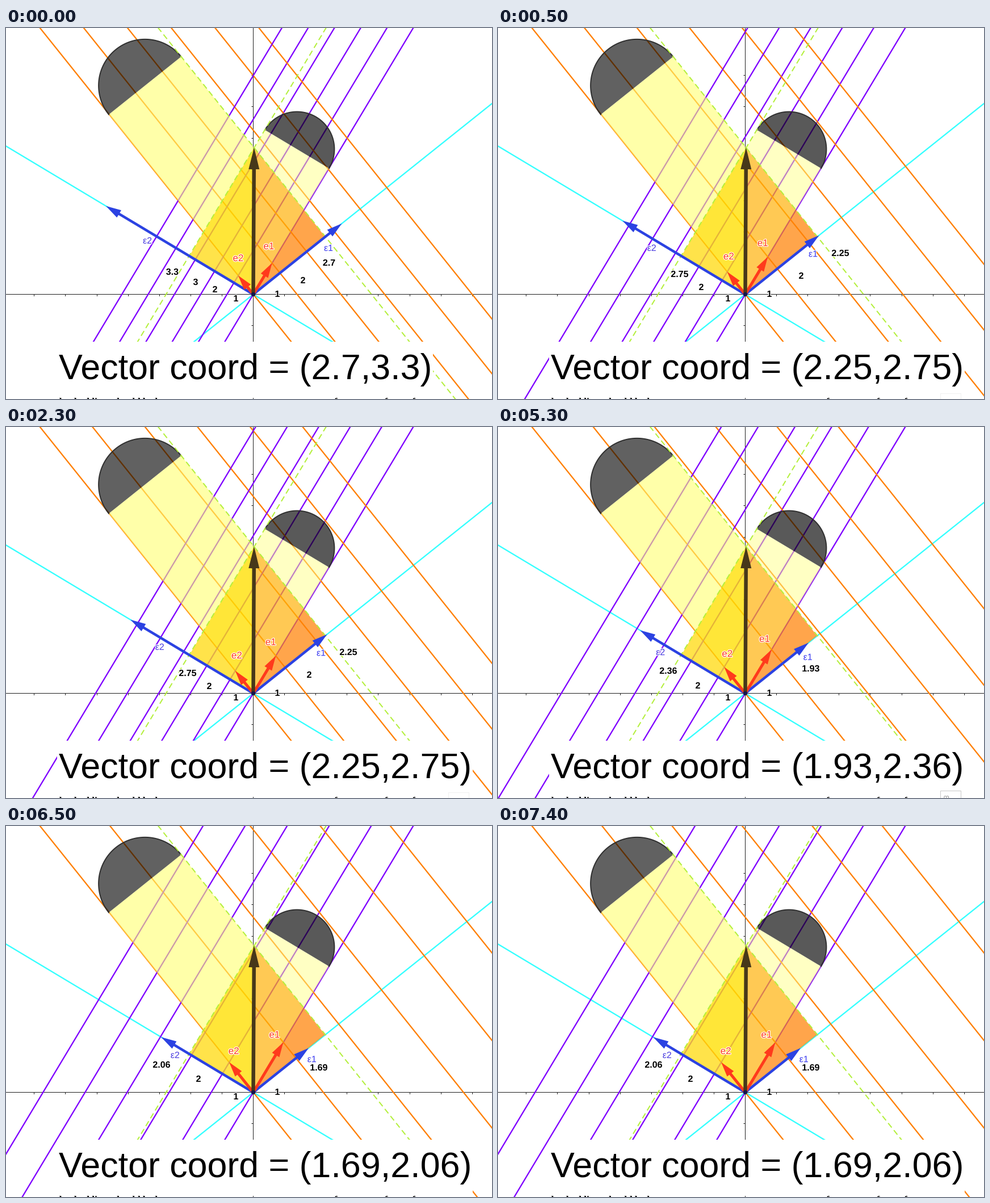
Write a matplotlib script that moves like this. It is 856 by 654 pixels and loops after 8000 ms.

```python
import numpy as np
import matplotlib.pyplot as plt
from matplotlib.animation import FuncAnimation
from matplotlib.patches import Circle, Polygon, Rectangle, Wedge
from matplotlib.patheffects import withStroke

W, H, DPI = 856, 654, 100
PX = 72 / DPI                       # points per pixel
SANS = "Liberation Sans"

UNIT = 55.1
O = np.array([435.5, 469.5])
TIP = np.array([437.0, 211.0])
E1, E2 = UNIT * np.array([0.6, -1.0]), UNIT * np.array([-0.48, -0.6])
D1, D2 = 156 * np.array([1.0, -0.8]), 259.5 * np.array([-1.0, -0.6])
FOOT1, FOOT2 = np.array([562.0, 368.0]), np.array([323.0, 402.0])
# where the grid lines through O meet the dashed lines through TIP
CROSS1, CROSS2 = np.array([524.8, 320.7]), np.array([347.7, 359.8])
LAMP1 = np.array([[181.0, 152.5], [308.5, 50.5]])
LAMP2 = np.array([[456.0, 179.6], [569.0, 247.4]])

ORANGE, PURPLE, CYAN, LIME = "#ff7f00", "#7f00ff", "#33ffff", "#b4f03c"
RED, BLUE, BROWN = "#ff3a1c", "#2b42e2", "#47381a"

# bold numbers beside the axes at each step: text, x, y
COUNTS = [
    [("3.3", 293, 429), ("3", 334, 447), ("2", 368, 460),
     ("2", 523, 444), ("2.7", 569, 413)],
    [("2.75", 320, 433), ("2", 358, 456), ("2", 534, 436), ("2.25", 603, 396)],
    [("2.36", 300, 429), ("2", 352, 455), ("1.93", 551, 425)],
    [("2.06", 274, 420), ("2", 339, 445), ("1.69", 551, 425)],
]
COORDS = ["(2.7,3.3)", "(2.25,2.75)", "(1.93,2.36)", "(1.69,2.06)"]

fig = plt.figure(figsize=(W / DPI, H / DPI), dpi=DPI, facecolor="white")
ax = fig.add_axes([0, 0, 1, 1])


def segment(a, b, color, width, z=1, dash="-"):
    ax.plot([a[0], b[0]], [a[1], b[1]], color=color, lw=width * PX, ls=dash,
            zorder=z, snap=False, solid_capstyle="butt", dash_capstyle="butt")


def full_line(point, direction, color, width=2.3, z=1, dash="-"):
    """Line across the whole stage, starting from its upper end."""
    u = direction / np.hypot(*direction)
    segment(point + 1200 * u, point - 1200 * u, color, width, z, dash)


def veil(points, seen, alpha):
    """Translucent polygon that looks like `seen` over white."""
    face = (np.array(seen) / 255 - (1 - alpha)) / alpha
    ax.add_patch(Polygon(points, facecolor=(*np.clip(face, 0, 1), alpha),
                         edgecolor="none", zorder=2))


def lamp(ends, alpha):
    mid = ends.mean(axis=0)
    chord = ends[1] - ends[0]
    r = np.hypot(*chord) / 2
    turn = np.degrees(np.arctan2(chord[1], chord[0]))
    ax.add_patch(Wedge(mid, r, turn + 180, turn + 360, facecolor=(0, 0, 0, alpha),
                       edgecolor="none", zorder=2.5))
    t = np.radians(np.linspace(turn + 180, turn + 360, 80))
    ax.plot(mid[0] + r * np.cos(t), mid[1] + r * np.sin(t), color="#303030",
            lw=2 * PX, zorder=2.6)


def arrow(tip, color, width, head, half, z=5):
    u = (tip - O) / np.hypot(*(tip - O))
    n = np.array([-u[1], u[0]])
    base = tip - head * u
    segment(O, base + u, color, width, z)
    ax.add_patch(Polygon([tip, base + half * n, base - half * n],
                         facecolor=color, edgecolor="none", zorder=z))


def label(text, x, y, color, size, bold=False):
    ax.text(x, y, text, color=color, fontsize=size * PX, family=SANS,
            weight="bold" if bold else "normal", ha="center",
            va="center_baseline", zorder=6,
            path_effects=[withStroke(linewidth=2.5 * PX, foreground="white")])


def draw_axes():
    segment((0, O[1]), (W, O[1]), "#202020", 1)
    segment((O[0], 0), (O[0], H), "#202020", 1)
    for k in range(-7, 9):
        x, y = np.floor(O + k * UNIT) + 0.5
        segment((x, O[1]), (x, O[1] + 3.5), "#202020", 1)
        segment((O[0] - 3, y), (O[0], y), "#202020", 1)


def draw_grid(s):
    full_line(O, D1, CYAN)
    full_line(O, D2, CYAN)
    for k in range(6):
        full_line(O + k * s * E1, E2, ORANGE)
        full_line(O + k * s * E2, E1, PURPLE)


def draw_beams():
    veil([*LAMP1, TIP, CROSS2], (255, 255, 170), 0.6)
    veil([*LAMP2, CROSS1, TIP], (255, 255, 196), 0.5)
    veil([O, CROSS2, TIP], (255, 230, 56), 0.8)
    veil([O, FOOT2, CROSS2], (255, 228, 74), 0.78)
    veil([O, TIP, CROSS1], (255, 201, 84), 0.7)
    veil([O, CROSS1, FOOT1], (255, 166, 76), 0.72)
    lamp(LAMP1, 0.62)
    lamp(LAMP2, 0.65)
    for direction in (E2, E1):
        full_line(TIP, direction, LIME, 2, 3, (0, (5, 3)))


def draw_vectors(s):
    arrow(O + D1 / s, BLUE, 4.5, 27, 7.5)
    arrow(O + D2 / s, BLUE, 4.5, 27, 7.5)
    arrow(O + E1 * s, RED, 5, 26, 7.5)
    arrow(O + E2 * s, RED, 5, 26, 7.5)
    arrow(TIP, BROWN, 6.5, 38, 9.5)
    ax.add_patch(Circle(O, 3.7, facecolor="#14144a", edgecolor="none", zorder=5.5))


def draw_labels(step, s):
    g, q = s - 1, 1 / s - 1
    label("e1", 463 + 16.5 * g, 384 - 28 * g, RED, 17)
    label("e2", 409 - 13 * g, 405 - 15 * g, RED, 17)
    label("ε1", 568 + 78 * q, 387 - 62 * q, "#3c3cf0", 16)
    label("ε2", 249 - 130 * q, 374 - 77.5 * q, "#4a3ce0", 16)
    for text, x, y in COUNTS[step] + [("1", 405, 476), ("1", 478, 468)]:
        label(text, x, y, "black", 16, True)


def draw_caption(step):
    right = 752 if step == 0 else 822
    ax.add_patch(Rectangle((90, 553), right - 90, H - 553, facecolor="white",
                           edgecolor="none", zorder=7))
    ax.text(93, 619, "Vector coord = " + COORDS[step], fontsize=62.8 * PX,
            family=SANS, color="black", va="baseline", zorder=8)
    # a text row cut off by the lower edge
    for x, text in ((88, "the dual lines should be here"),
                    (578, "for our new form of")):
        ax.text(x, 664, text, fontsize=17 * PX, family="Liberation Serif",
                weight="bold", va="baseline", zorder=8)
    segment((O[0], 652), (O[0], H), "#303030", 1, 8)
    if step in (1, 2):
        top, tone = ((644, "#f0f0f0"), (641, "#c8c8c8"))[step - 1]
        ax.add_patch(Rectangle((779, top), 36, 20, facecolor="white",
                               edgecolor=tone, lw=PX, zorder=9))
    if step == 2:
        ax.text(785, 656, "co", fontsize=10 * PX, family=SANS,
                color="#888888", va="baseline", zorder=10)


def draw(i):
    step = int(np.searchsorted([1, 7, 13], i, side="right"))
    s = 1 + 0.2 * step
    ax.clear()
    ax.set(xlim=(0, W), ylim=(H, 0), autoscale_on=False)
    ax.axis("off")
    draw_axes()
    draw_grid(s)
    draw_beams()
    draw_vectors(s)
    draw_labels(step, s)
    draw_caption(step)
    return []


anim = FuncAnimation(fig, draw, frames=16, interval=500, repeat=True,
                     repeat_delay=0, cache_frame_data=False)
plt.show()
```
